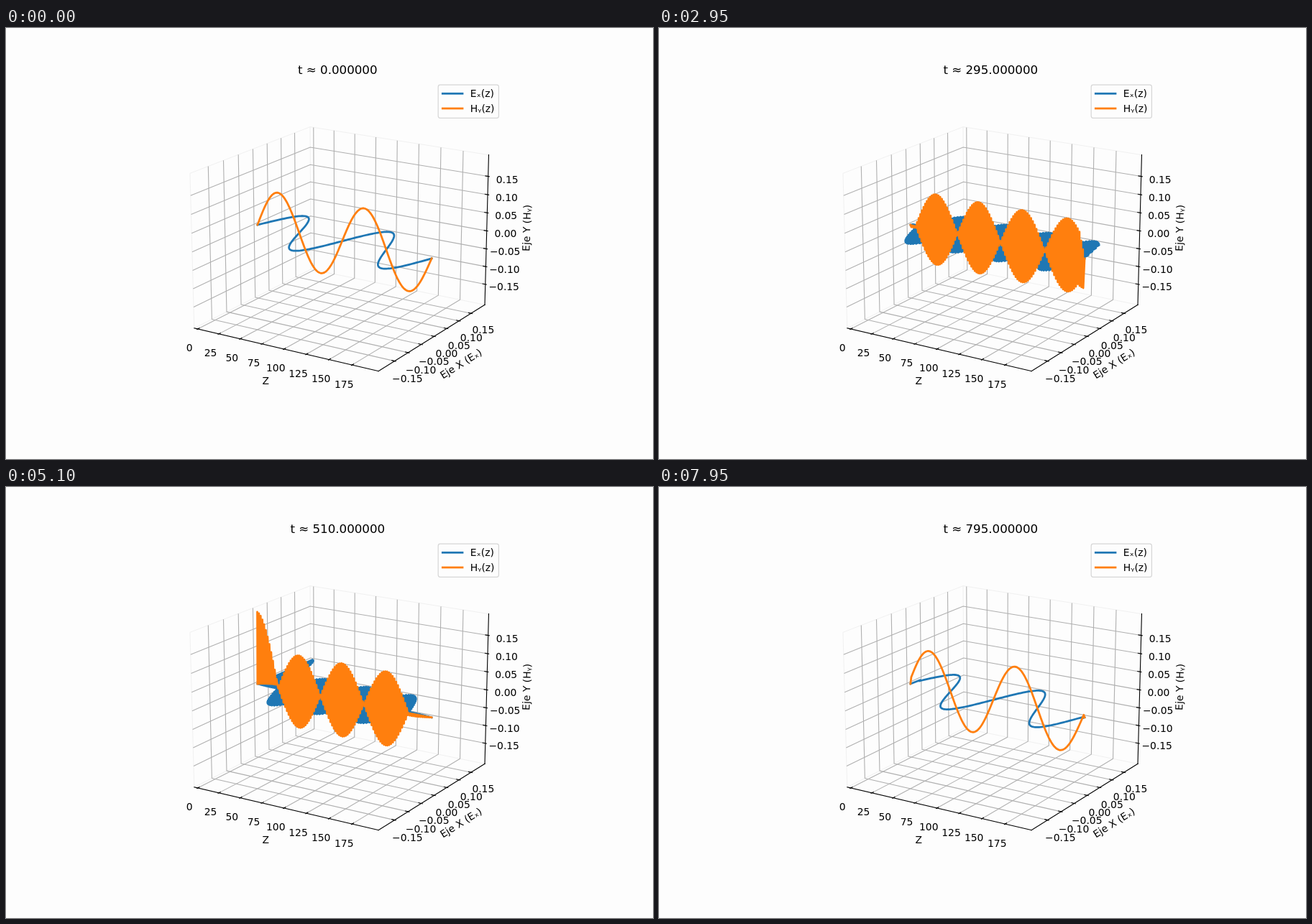
These frames come from a looping animation (900x600 px, 8 s). An HTML page with a canvas:

```html
<!DOCTYPE html>
<html lang="es">
<head>
<meta charset="utf-8">
<title>Onda electromagnética</title>
<style>
html, body { margin: 0; width: 100%; height: 100%; overflow: hidden; background: #fdfdfd; }
canvas { display: block; }
</style>
</head>
<body>
<canvas id="stage" width="900" height="600"></canvas>
<script>
const ctx = document.getElementById('stage').getContext('2d');
const BLUE = '#1f77b4', ORANGE = '#ff7f0e', PAPER = '#fdfdfd';
const PT = 100 / 72;
const FONT = '"DejaVu Sans", sans-serif';

// --- Field simulation: two coupled grids, ends held at zero ---
const N = 200, FRAMES = 160, STEPS = 5, FRAME_MS = 50;

function advance(target, other) {
  for (let k = 1; k < N - 1; k++) target[k] -= other[k + 1] - other[k - 1];
}

function simulate() {
  const e = Float64Array.from({ length: N }, (_, k) => 0.1 * Math.sin(4 * Math.PI * k / (N - 1)));
  e[N - 1] = 0;
  const h = e.slice();
  const states = [];
  for (let f = 0; f < FRAMES; f++) {
    states.push({ e: e.slice(), h: h.slice() });
    for (let s = 0; s < STEPS; s++) {
      advance(e, h);
      advance(h, e);
    }
  }
  return states;
}

// --- Perspective camera ---
const RANGE = [N - 1, 0.4, 0.4];
const MID = [(N - 1) / 2, 0, 0];
const BOX = [8 / 7, 8 / 7, 6 / 7];
const ELEV = 18 * Math.PI / 180, AZIM = -58 * Math.PI / 180;
const DIST = 10, SCALE = 462 / 0.185;
const CENTER = { x: 230.25 + 0.095 * SCALE, y: 534 - 0.095 * SCALE };
const ce = Math.cos(ELEV), se = Math.sin(ELEV), ca = Math.cos(AZIM), sa = Math.sin(AZIM);

function project(p) {
  const [x, y, z] = p.map((v, i) => (v - MID[i]) / RANGE[i] * BOX[i]);
  const depth = DIST - (ce * ca * x + ce * sa * y + se * z);
  const k = SCALE / depth;
  return [
    CENTER.x + k * (-sa * x + ca * y),
    CENTER.y - k * (-se * ca * x - se * sa * y + ce * z)
  ];
}

const LO = MID.map((m, i) => m - RANGE[i] * 25 / 48);
const HI = MID.map((m, i) => m + RANGE[i] * 25 / 48);
const [x0, y0, z0] = LO, [x1, y1, z1] = HI;

function polyline(points, color, width, cap = 'butt') {
  ctx.beginPath();
  for (const p of points) ctx.lineTo(...project(p));
  ctx.strokeStyle = color;
  ctx.lineWidth = width;
  ctx.lineCap = cap;
  ctx.lineJoin = 'round';
  ctx.stroke();
}

function text(str, x, y, size = 10, align = 'center') {
  ctx.font = `${size * PT}px ${FONT}`;
  ctx.textAlign = align;
  ctx.textBaseline = 'alphabetic';
  ctx.fillStyle = '#000';
  ctx.fillText(str, x, y);
}

// --- Axes ---
const small = [-3, -2, -1, 0, 1, 2, 3].map(i => i * 0.05);
const decimals = v => v.toFixed(2).replace('-', '\u2212');

const axes = [
  {
    ticks: [0, 25, 50, 75, 100, 125, 150, 175], format: String, name: 'Z', turn: false,
    line: [[x0, y0, z0], [x1, y0, z0]], out: [0, -1, -1], tickDir: 1,
    grid: t => [[t, y0, z0], [t, y1, z0], [t, y1, z1]]
  },
  {
    ticks: small, format: decimals, name: 'Eje X (E\u2093)', turn: true,
    line: [[x1, y0, z0], [x1, y1, z0]], out: [1, 0, -1], tickDir: 0,
    grid: t => [[x1, t, z0], [x0, t, z0], [x0, t, z1]]
  },
  {
    ticks: small, format: decimals, name: 'Eje Y (H\u1d67)', turn: true,
    line: [[x1, y1, z0], [x1, y1, z1]], out: [1, 1, 0], tickDir: 0,
    grid: t => [[x0, y0, t], [x0, y1, t], [x1, y1, t]]
  }
];

const shift = (p, dir, amount) => p.map((v, i) => v + dir[i] * amount * RANGE[i]);

function drawPanes() {
  const edge = '#f1f1f1';
  polyline([[x0, y0, z0], [x0, y0, z1], [x0, y1, z1], [x1, y1, z1]], edge, 1);
  polyline([[x0, y0, z0], [x0, y1, z0], [x1, y1, z0]], edge, 1);
  polyline([[x0, y1, z0], [x0, y1, z1]], edge, 1);
}

function drawAxis(axis, i) {
  const thin = 0.8 * PT;
  const [a, b] = axis.line;
  polyline(axis.line, '#000', thin, 'square');

  const dir = [0, 0, 0];
  dir[axis.tickDir] = axis.out[axis.tickDir];
  for (const t of axis.ticks) {
    const p = a.slice();
    p[i] = t;
    polyline([shift(p, dir, 0.1 / 12), shift(p, dir, -0.2 / 12)], '#000', thin);
    const [lx, ly] = project(shift(p, axis.out, 0.06914));
    text(axis.format(t), lx, Math.round(ly + 10.7));
  }

  const mid = a.map((v, j) => (v + b[j]) / 2);
  const [ax, ay] = project(a), [bx, by] = project(b);
  ctx.save();
  ctx.translate(...project(shift(mid, axis.out, 0.1503)));
  if (axis.turn) ctx.rotate(Math.atan2(by - ay, bx - ax));
  text(axis.name, 0, 3.7);
  ctx.restore();
}

function drawLegend() {
  ctx.beginPath();
  ctx.roundRect(601.2, 79.2, 84.2, 46.2, 2.8);
  ctx.fillStyle = PAPER;
  ctx.fill();
  ctx.strokeStyle = '#d6d6d6';
  ctx.lineWidth = 1.2;
  ctx.stroke();
  [['E\u2093(z)', BLUE, 91.3], ['H\u1d67(z)', ORANGE, 112]].forEach(([label, color, y]) => {
    ctx.beginPath();
    ctx.moveTo(607.3, y);
    ctx.lineTo(635, y);
    ctx.strokeStyle = color;
    ctx.lineWidth = 2 * PT;
    ctx.lineCap = 'square';
    ctx.stroke();
    text(label, 645.8, Math.round(y + 4.6), 10, 'left');
  });
}

// --- Playback ---
const states = simulate();

function draw(frame) {
  const { e, h } = states[frame];
  ctx.fillStyle = PAPER;
  ctx.fillRect(0, 0, 900, 600);
  drawPanes();
  for (const axis of axes)
    for (const t of axis.ticks) polyline(axis.grid(t), '#b0b0b0', 0.8 * PT);
  axes.forEach(drawAxis);
  polyline(Array.from(e, (v, k) => [k, v, 0]), BLUE, 2 * PT, 'square');
  polyline(Array.from(h, (v, k) => [k, 0, v]), ORANGE, 2 * PT, 'square');
  text(`t \u2248 ${(frame * STEPS).toFixed(6)}`, 461.25, 64, 12);
  drawLegend();
}

const start = performance.now();
function tick() {
  const elapsed = Math.max(0, performance.now() - start);
  draw(Math.floor(elapsed / FRAME_MS) % FRAMES);
  requestAnimationFrame(tick);
}
tick();
</script>
</body>
</html>
```
